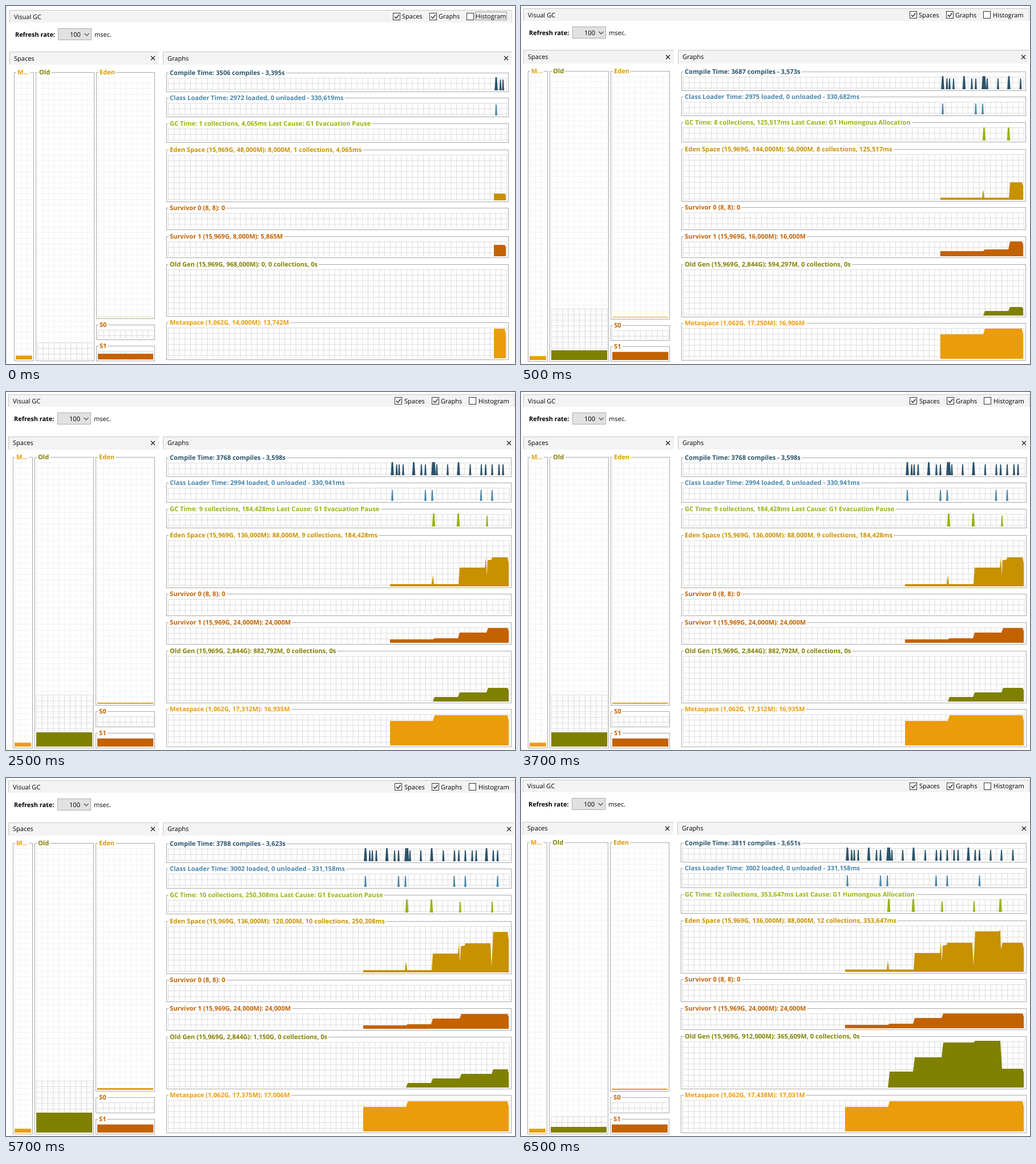
Write an HTML page that moves like this. It is 892 by 628 pixels and loops after 8000 ms.

```html
<!DOCTYPE html>
<html lang="en">
<head>
<meta charset="utf-8">
<title>Visual GC</title>
<style>
html, body { margin: 0; width: 100%; height: 100%; overflow: hidden; background: #fff; }
svg { display: block; width: 892px; height: 628px; }
text { font-family: "Open Sans", "Noto Sans", sans-serif; text-rendering: geometricPrecision; white-space: pre; }
.b { font-weight: 700; }
.view { visibility: hidden; animation: 8s step-end infinite; }
#v0 { animation-name: show0; }
#v1 { animation-name: show1; }
#v2 { animation-name: show2; }
#v3 { animation-name: show3; }
#v4 { animation-name: show4; }
@keyframes show0 { 0% { visibility: visible; } 6.25%, 100% { visibility: hidden; } }
@keyframes show1 { 0% { visibility: hidden; } 6.25% { visibility: visible; } 31.25%, 100% { visibility: hidden; } }
@keyframes show2 { 0% { visibility: hidden; } 31.25% { visibility: visible; } 56.25%, 100% { visibility: hidden; } }
@keyframes show3 { 0% { visibility: hidden; } 56.25% { visibility: visible; } 81.25%, 100% { visibility: hidden; } }
@keyframes show4 { 0% { visibility: hidden; } 81.25%, 100% { visibility: visible; } }
</style>
</head>
<body>
<svg id="stage" viewBox="0 0 892 628" xmlns="http://www.w3.org/2000/svg"></svg>
<script>
const INK = { compile: '#2b536b', loader: '#4a87ab', gc: '#99b30f', eden: '#c89100',
  surv: '#c46200', old: '#808000', meta: '#eb9c0a' };
const pen = document.createElement('canvas').getContext('2d');

const compiles = [[4, 1], [11.5], [16], [23], [41.5, 1], [55], [62], [75, 1], [77.5, 1], [82], [101],
  [120, 1], [140.5], [160], [167.5], [179], [191], [198], [216, 1], [228], [235.5], [255], [274], [294]];
const loads = [[4], [62], [74], [159.5], [179], [235.5]];
const pauses = [[76.5, 1], [119.5, 1], [170], [226], [272, 1]];
const edenCurve = [[0, 4], [73, 4], [75, 20], [77, 4], [120, 4], [122, 33], [166, 33], [168, 51],
  [169.5, 18], [171, 46], [178, 47], [179, 51], [223, 51], [225, 10], [228, 71], [270, 71],
  [272, 74], [273, 40], [276, 51]];
const stepTimes = [75, 119, 169, 225, 272];

// A stair of levels with a short ramp at each step
const stairs = hs => hs.flatMap((h, i) => i ? [[stepTimes[i - 1], hs[i - 1]], [stepTimes[i - 1] + 3, h]] : [[0, h]]);

const views = [
  { map: [1, 0, 1, 0], now: 21, compile: '3506 compiles - 3,395s', loader: '2972 loaded, 0 unloaded - 330,619ms',
    count: 1, ms: '4,065ms', cause: 'Evacuation Pause', edenCap: '48,000M', edenUse: '8,000M',
    s1: '8,000M): 5,865M', old: '968,000M): 0', meta: '14,000M): 13,742M',
    eden: [[0, 12]], surv: [20], gen: [0], space: [52], oldBar: 0, oldGrid: 30, edenBar: 1, s1Bar: 10 },
  { map: [1.0068, -2, 1.0068, -3.05], now: 145, compile: '3687 compiles - 3,573s', loader: '2975 loaded, 0 unloaded - 330,682ms',
    count: 8, ms: '125,517ms', cause: 'Humongous Allocation', edenCap: '144,000M', edenUse: '56,000M',
    s1: '16,000M): 16,000M', old: '2,844G): 594,297M', meta: '17,250M): 16,906M',
    eden: edenCurve.map(([u, h]) => [u, h * .93]), surv: [9, 12, 26], gen: [0, 8, 15], space: [43, 53],
    oldBar: 17, oldGrid: 90, edenBar: 2, s1Bar: 14 },
  { map: [1.008, -2, 1.008, -3], now: 208, compile: '3768 compiles - 3,598s', loader: '2994 loaded, 0 unloaded - 330,941ms',
    count: 9, ms: '184,428ms', cause: 'Evacuation Pause', edenCap: '136,000M', edenUse: '88,000M',
    s1: '24,000M): 24,000M', old: '2,844G): 882,792M', meta: '17,312M): 16,935M',
    eden: edenCurve, surv: [6, 8, 18, 26], gen: [0, 8, 16, 24], space: [43, 53],
    oldBar: 25, oldGrid: 91, edenBar: 2, s1Bar: 14 },
  { map: [1.008, -2, 1.008, -3], now: 255, compile: '3788 compiles - 3,623s', loader: '3002 loaded, 0 unloaded - 331,158ms',
    count: 10, ms: '250,308ms', cause: 'Evacuation Pause', edenCap: '136,000M', edenUse: '120,000M',
    s1: '24,000M): 24,000M', old: '2,844G): 1,150G', meta: '17,375M): 17,006M',
    eden: edenCurve, surv: [6, 8, 18, 26], gen: [0, 8, 16, 24, 32], space: [43, 53],
    oldBar: 35, oldGrid: 91, edenBar: 3, s1Bar: 14 },
  { map: [1.0095, -3.2, 1.01, -4.3], now: 313, compile: '3811 compiles - 3,651s', loader: '3002 loaded, 0 unloaded - 331,158ms',
    count: 12, ms: '353,647ms', cause: 'Humongous Allocation', edenCap: '136,000M', edenUse: '88,000M',
    s1: '24,000M): 24,000M', old: '912,000M): 365,609M', meta: '17,438M): 17,031M',
    eden: edenCurve, surv: [6, 8, 18, 26], gen: [0, 28, 53, 79, 82, 33], space: [43, 53],
    oldBar: 10, oldGrid: 28, edenBar: 2, s1Bar: 14 }
];

function render(v, index) {
  const [sx, tx, sy, ty] = v.map;
  const X = x => Math.round(x * sx + tx), Y = y => Math.round(y * sy + ty);
  const out = [];
  const rect = (x, y, w, h, fill) => out.push(`<rect x="${x}" y="${y}" width="${w}" height="${h}" fill="${fill}"/>`);
  const frame = (l, t, r, b, line, fill = 'none') =>
    out.push(`<rect x="${l + .5}" y="${t + .5}" width="${r - l}" height="${b - t}" fill="${fill}" stroke="${line}"/>`);
  const stroke = (d, color, w = 1) => out.push(`<path d="${d}" fill="none" stroke="${color}" stroke-width="${w}"/>`);
  const area = (d, fill) => out.push(`<path d="${d}" fill="${fill}"/>`);
  const text = (x, y, s, size = 11, fill = '#000', cls = '') =>
    out.push(`<text x="${x}" y="${y}" font-size="${size * sx}" fill="${fill}" class="${cls}">${s}</text>`);

  function grid(l, t, r, b, color) {
    const gap = 9.72 * sx;
    let d = '';
    for (let x = l; x <= r; x += gap) d += `M${x + .5} ${t}V${b}`;
    for (let y = t; y <= b; y += gap) d += `M${l} ${y + .5}H${r}`;
    stroke(d, color);
  }

  // Captioned box; returns the inner area
  function box(x0, y0, x1, y1, label, color, labelX) {
    const l = X(x0), t = Y(y0), r = X(x1), b = Y(y1), size = 11.05, at = X(labelX);
    frame(l, t, r, b, '#a9a9a9');
    pen.font = `700 ${size * sx}px "Open Sans", "Noto Sans", sans-serif`;
    rect(at - 2, t - 1, pen.measureText(label).width + 4, 3, '#fff');
    text(at, t + 4, label, size, color, 'b');
    return { l: l + 3, t: t + 9, r: r - 2, b: b - 2 };
  }

  function band(x0, y0, x1, y1, label) {
    const l = X(x0), t = Y(y0), r = X(x1), b = Y(y1);
    rect(l, t, r - l, b - t, '#f3f3f3');
    stroke(`M${l + .5} ${b}V${t + .5}H${r}`, '#c6c6c6');
    text(X(x0 + 8), Y(y0 + 15.5), label);
  }

  function close(x, y) {
    const a = X(x) + .5, c = Y(y) + .5;
    stroke(`M${a - 3.5} ${c - 3.5}l7 7m0 -7l-7 7`, '#222', 1.3);
  }

  function check(x, label, on) {
    const l = X(x), t = Y(12);
    frame(l, t, l + 12, t + 12, '#333', '#fff');
    if (on) stroke(`M${l + 3} ${t + 6.5}l2.7 3l4.8 -6`, '#222', 1.4);
    text(X(x + 16.3), Y(22.4), label);
  }

  // Toolbar
  band(6, 7, 886, 29, 'Visual GC');
  stroke(`M${X(886) + .5} ${Y(7)}V${Y(29)}`, '#d4d4d4');
  check(678, 'Spaces', true);
  check(742, 'Graphs', true);
  check(807, 'Histogram', false);
  if (!index) {
    out.push('<rect x="822.5" y="10.5" width="55" height="14" fill="none" stroke="#333" stroke-dasharray="1 1"/>');
    rect(0, 0, 1, 628, '#d6d6d6');
  }
  text(X(15.7), Y(54), 'Refresh rate:', 10.9, '#000', 'b');
  frame(X(91), Y(39), X(149), Y(60) - 1, '#adadad', '#e1e1e1');
  text(X(112), Y(54), '100');
  stroke(`M${X(141) - 3.5} ${Y(49) - 1}l4 4l4 -4`, '#444', 1.1);
  text(X(155), Y(54), 'msec.');

  // Spaces
  band(6, 80, 268, 103, 'Spaces');
  close(257, 91);
  const faint = '#f1f1f1', firm = '#dcdcdc';
  function space(x0, y0, x1, y1, label, color, labelX, barH, ink, firmH) {
    const p = box(x0, y0, x1, y1, label, color, labelX);
    grid(p.l, p.t, p.r, p.b, faint);
    if (firmH) grid(p.l, Math.max(p.t, p.b - firmH), p.r, p.b, firm);
    if (barH) rect(p.l, p.b - barH, p.r - p.l, barH, ink);
    return p;
  }
  const m = space(14, 116, 48, 622, 'M...', INK.meta, 20, 7, INK.meta);
  rect(m.l, m.b - 7, m.r - m.l, 1, '#e6bf2a');
  space(52, 116, 154, 622, 'Old', INK.old, 58, v.oldBar, INK.old, v.oldGrid);
  space(158, 116, 260, 548, 'Eden', '#d79a05', 164, v.edenBar, ['#ead9a0', '#ecd075', '#d9a520', '#d9a010', '#d9a520'][index]);
  space(158, 559, 260, 585, 'S0', INK.surv, 164, 0, '', 99);
  space(158, 596, 260, 622, 'S1', INK.surv, 164, v.s1Bar, INK.surv, 99);

  // Graphs
  band(275, 80, 886, 103, 'Graphs');
  close(876, 91);
  function graph(y0, y1, label, color) {
    const p = box(281, y0, 880, y1, label, color, 287);
    grid(p.l, p.t, p.r, p.b, firm);
    return p;
  }
  const edge = X(877) - 1, at = u => edge - v.now + u;

  function spikes(p, list, color) {
    for (const [u, tall] of list) {
      if (u > v.now - 2) continue;
      const w = tall ? 2.8 : 1.9, h = tall ? 23 : 19, x = at(u);
      area(`M${x - w} ${p.b}L${x - w * .45} ${p.b - h}H${x + w * .45}L${x + w} ${p.b}Z`, color);
    }
  }

  function fill(p, curve, color) {
    const seen = curve.filter(([u]) => u < v.now - 2), last = seen[seen.length - 1][1];
    const pts = [...seen, [v.now - 2, last], [v.now, last * .8]];
    area(`M${at(0)} ${p.b}` + pts.map(([u, h]) => `L${at(u)} ${p.b - h}`).join('') + `V${p.b}Z`, color);
  }

  const heap = '(15,969G, ', runs = `${v.count} collections, ${v.ms}`;
  spikes(graph(117, 150, `Compile Time: ${v.compile}`, INK.compile), compiles, INK.compile);
  spikes(graph(161, 194, `Class Loader Time: ${v.loader}`, INK.loader), loads, INK.loader);
  spikes(graph(206, 239, `GC Time: ${runs} Last Cause: G1 ${v.cause}`, INK.gc), pauses, INK.gc);
  fill(graph(252, 343, `Eden Space ${heap}${v.edenCap}): ${v.edenUse}, ${runs}`, INK.eden), v.eden, INK.eden);
  graph(354, 392, 'Survivor 0 (8, 8): 0', INK.surv);
  fill(graph(404, 441, `Survivor 1 ${heap}${v.s1}`, INK.surv), stairs(v.surv), INK.surv);
  fill(graph(453, 544, `Old Gen ${heap}${v.old}, 0 collections, 0s`, INK.old), stairs(v.gen), INK.old);
  fill(graph(555, 620, `Metaspace (1,062G, ${v.meta}`, INK.meta), stairs(v.space), INK.meta);

  return `<g class="view" id="v${index}">${out.join('')}</g>`;
}

document.getElementById('stage').innerHTML = views.map(render).join('');
</script>
</body>
</html>
```
